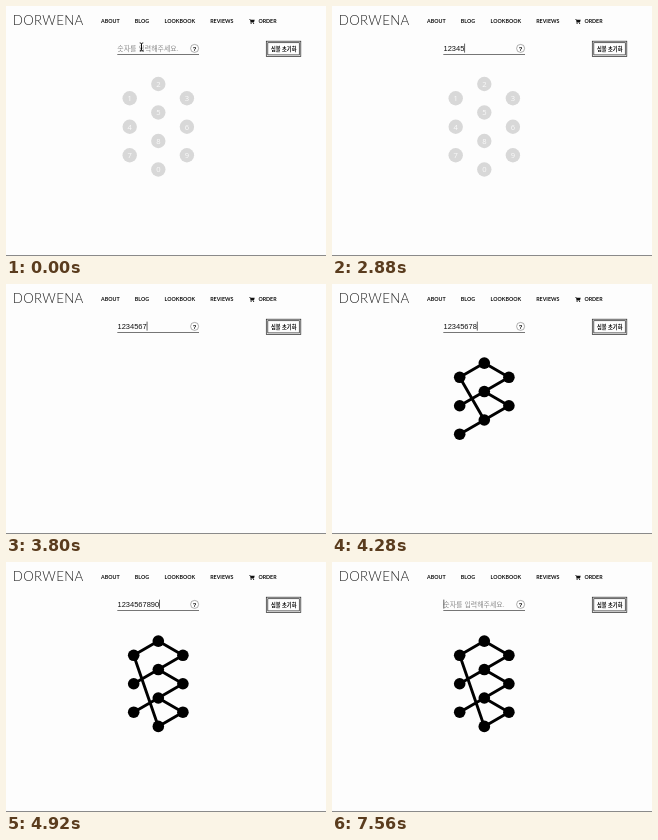
Recreate the animation shown at these times as an HTML page. Size 320 px wide and 250 px high, loop 8 s.

```html
<!DOCTYPE html>
<html lang="ko">
<head>
<meta charset="utf-8">
<style>
  html, body { margin: 0; width: 100%; height: 100%; overflow: hidden; background: #fdfdfd; }
  svg { display: block; width: 100vw; height: 100vh; }
  .logo { font: 300 13.3px Lato, sans-serif; letter-spacing: .3px; fill: #222; }
  .nav { font: 700 5.3px Lato, sans-serif; fill: #111; }
  .korean { font-family: "Noto Sans CJK KR", "Noto Sans CJK", sans-serif; }
  .hint { font-size: 6.95px; fill: #8c8c8c; }
  .button { font-size: 5.2px; font-weight: 700; fill: #111; }
  .typed { font: 7.5px "Liberation Sans", Arial, sans-serif; fill: #111; }
  .help { font: 700 6px "Liberation Sans", Arial, sans-serif; fill: #111; text-anchor: middle; }
  .guide circle { fill: #d8d8d8; }
  .guide text { font: 7.6px "Open Sans", sans-serif; fill: #fafafa; text-anchor: middle; }
  .symbol path { fill: none; stroke: #000; stroke-width: 2.9; stroke-linejoin: round; }
</style>
</head>
<body>
<svg viewBox="0 0 320 250">
  <text class="logo" x="6.8" y="19.2">DORWENA</text>
  <g class="nav">
    <text x="95" y="17.2">ABOUT</text>
    <text x="128.8" y="17.2">BLOG</text>
    <text x="158.6" y="17.2">LOOKBOOK</text>
    <text x="204.2" y="17.2">REVIEWS</text>
    <text x="252.4" y="17.2">ORDER</text>
    <path d="M243 13h1.2l.3.7h4.2l-.6 2.3h-3l.1.5h2.8v.5h-3.3l-.7-3.4h-1z"/>
    <circle cx="245.1" cy="17.5" r=".6"/>
    <circle cx="247.6" cy="17.5" r=".6"/>
  </g>

  <path d="M111.3 48.5H193" stroke="#555" stroke-width=".8"/>
  <circle cx="188.6" cy="42.4" r="4" fill="#fff" stroke="#777" stroke-width=".6"/>
  <text class="help" x="188.6" y="44.6">?</text>

  <g fill="none" stroke="#222" stroke-width=".7">
    <rect x="260.3" y="35.2" width="34.5" height="15.2"/>
    <rect x="261.8" y="36.7" width="31.5" height="12.2"/>
  </g>
  <text class="korean button" x="265.1" y="44.6">심볼 초기화</text>

  <text class="korean hint" id="hint" x="111.3" y="44.6">숫자를 입력해주세요.</text>
  <text class="typed" id="typed" x="111.5" y="45"></text>
  <rect id="caret" y="37.6" width=".7" height="9" fill="#222"/>

  <g class="guide" id="guide"></g>
  <g class="symbol" id="symbol"><path/></g>

  <path id="beam" d="M133.7 36.9q1.8 0 1.8 1v6q0 1-1.8 1M137.3 36.9q-1.8 0-1.8 1v6q0 1 1.8 1M134.6 42.2h1.8" fill="none" stroke="#000" stroke-width=".8"/>
  <path id="arrow" d="M105.4 16.4v7.6l1.8-1.7 1.2 2.8 1.2-.5-1.2-2.7h2.4z" fill="#000" stroke="#fff" stroke-width=".5"/>
  <path d="M0 249.5H320" stroke="#8a8a8a"/>
</svg>
<script>
const LOOP = 8000;
const DIGITS = "1234567890";
const ADVANCE = 4.17;

// Each track lists [start time, value]; values hold until the next entry.
const typedCount = [
  [0, 0], [1640, 1], [1920, 2], [2160, 3], [2520, 4], [2880, 5], [3240, 6],
  [3720, 7], [4040, 8], [4400, 9], [4720, 10],
  [6760, 9], [6840, 8], [6880, 7], [6960, 6], [7040, 4], [7080, 3], [7160, 1], [7560, 0]
];
const symbolCount = [
  [0, 0], [3400, 6], [3800, 0], [3920, 7], [4120, 0], [4280, 8],
  [4480, 0], [4600, 9], [4800, 0], [4920, 10]
];
const caretOn = [
  [0, false], [320, true], [880, false], [1400, true],
  [5200, false], [5720, true], [6160, false], [6760, true]
];
const pointer = [[0, "beam"], [1560, ""], [6160, "arrow"], [6760, ""]];

const $ = id => document.getElementById(id);
const at = (track, t) => track.filter(([start]) => start <= t).pop()[1];
const show = (node, on) => node.setAttribute("visibility", on ? "visible" : "hidden");

function add(parent, tag, attrs) {
  const node = document.createElementNS("http://www.w3.org/2000/svg", tag);
  for (const name in attrs) node.setAttribute(name, attrs[name]);
  return parent.appendChild(node);
}

// Keypad nodes zigzag: the middle column sits half a row above the sides.
function place(i, spread, top, step) {
  const column = i === 9 ? 0 : i % 3 - 1;
  const row = Math.floor(i / 3) * 2 + (column ? 1 : 0);
  return [152.3 + column * spread, top + row * step];
}

const nodes = [...DIGITS].map((digit, i) => {
  const [gx, gy] = place(i, 28.6, 78, 14.25);
  add($("guide"), "circle", { cx: gx, cy: gy, r: 7.2 });
  add($("guide"), "text", { x: gx, y: gy + 2.8 }).textContent = digit;
  return place(i, 24.6, 79.1, 14.22);
});
const dots = nodes.map(([cx, cy]) => add($("symbol"), "circle", { cx, cy, r: 5.8 }));
const line = $("symbol").querySelector("path");

function draw(t) {
  const count = at(typedCount, t);
  $("typed").textContent = DIGITS.slice(0, count);
  show($("hint"), count === 0);
  $("caret").setAttribute("x", 111.5 + count * ADVANCE);
  show($("caret"), at(caretOn, t));

  const used = at(symbolCount, t);
  show($("guide"), t < 3400);
  line.setAttribute("d", used ? `M${nodes.slice(0, used).join("L")}Z` : "");
  dots.forEach((dot, i) => show(dot, i < used));

  for (const id of ["beam", "arrow"]) show($(id), at(pointer, t) === id);
}

const began = performance.now();
function tick() {
  draw((performance.now() - began) % LOOP);
  requestAnimationFrame(tick);
}
tick();
</script>
</body>
</html>
```
